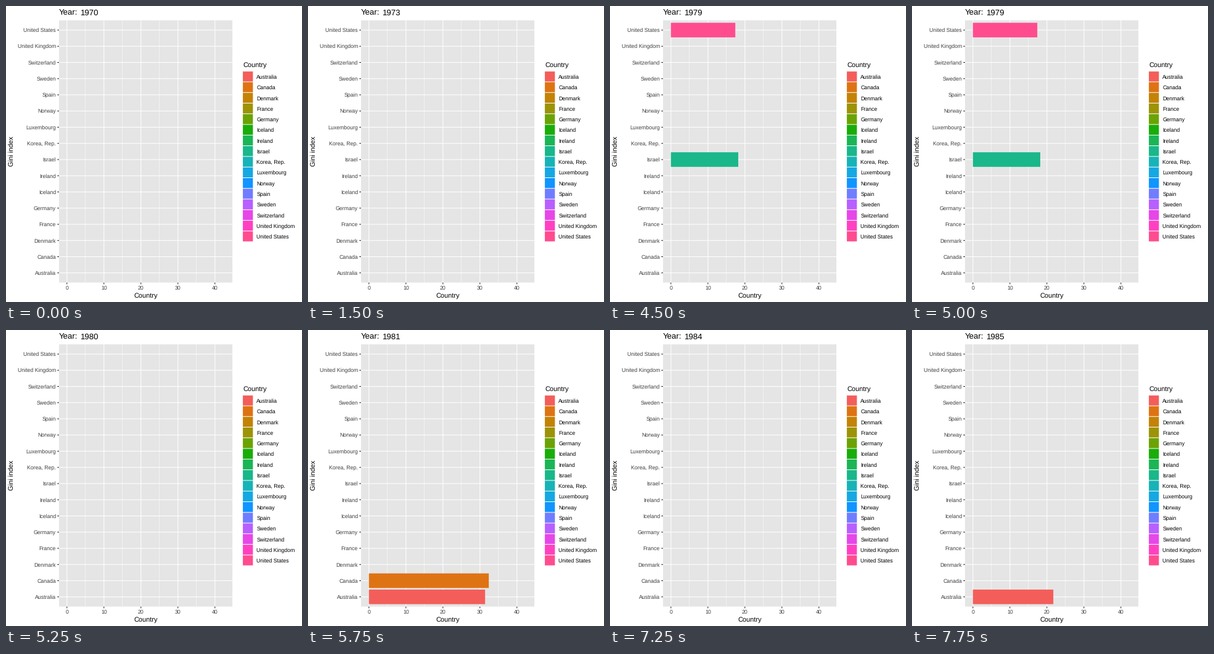
These frames come from a looping animation (480 px wide and 480 px high, 8 s). A matplotlib script:

```python
import matplotlib.pyplot as plt
from matplotlib.animation import FuncAnimation
from matplotlib.patches import Rectangle

plt.rcParams.update({"font.family": "Liberation Sans", "text.hinting": "none"})

SIZE, DPI = 480, 72
LEFT, RIGHT, TOP, BOTTOM = 86.0, 367.1, 23.3, 448.5
STEP = (BOTTOM - TOP) / 16.2
ZERO = LEFT + (RIGHT - LEFT) / 22
UNIT = 6.0
KEY = 17.28
LINE = 1.07
INK, LABEL, PANEL = "#272727", "#404040", "#e5e5e5"

COUNTRIES = {
    "Australia": "#f35e5a", "Canada": "#de7313", "Denmark": "#c38306",
    "France": "#9c9307", "Germany": "#6ba204", "Iceland": "#1aad0a",
    "Ireland": "#1bb556", "Israel": "#19b78a", "Korea, Rep.": "#17b3b7",
    "Luxembourg": "#15a8e2", "Norway": "#1195ff", "Spain": "#707dff",
    "Sweden": "#b85fff", "Switzerland": "#e647e8",
    "United Kingdom": "#ff41c1", "United States": "#ff4c8f",
}

# country, Gini value, {frame: share of the full length}
RISES = [
    ("United States", 34.8, {18: 1 / 2, 19: 1, 20: 1 / 2}),
    ("Israel", 36.4, {18: 1 / 2, 19: 1, 20: 1 / 2}),
    ("Canada", 32.4, {22: 1 / 2, 23: 1, 24: 1 / 2}),
    ("Australia", 31.4, {22: 1 / 2, 23: 1, 24: 1 / 2}),
    ("Australia", 32.6, {30: 1 / 3, 31: 2 / 3}),
]

fig = plt.figure(figsize=(SIZE / DPI, SIZE / DPI), dpi=DPI, facecolor="white")
ax = fig.add_axes([0, 0, 1, 1])
ax.set(xlim=(0, SIZE), ylim=(SIZE, 0))
ax.axis("off")


def box(x, y, w, h, color, z=1):
    return ax.add_patch(Rectangle((x, y), w, h, fc=color, lw=0, zorder=z, snap=False))


def line(x0, y0, x1, y1, color="white", width=LINE):
    ax.plot([x0, x1], [y0, y1], color=color, lw=width, zorder=2,
            solid_capstyle="butt", snap=False)


def text(x, y, s, size=8.8, color="black", ha="left", **kw):
    return ax.text(x, y, s, fontsize=size, color=color, ha=ha, va="baseline", **kw)


def row_y(i):
    return BOTTOM - (0.6 + i) * STEP


box(LEFT, TOP, RIGHT - LEFT, BOTTOM - TOP, PANEL)
for value in range(5, 40, 10):
    x = ZERO + value * UNIT
    line(x, TOP, x, BOTTOM, width=LINE / 2)
for value in range(0, 50, 10):
    x = ZERO + value * UNIT
    line(x, TOP, x, BOTTOM)
    line(x, BOTTOM, x, BOTTOM + 2.75, INK)
    text(x, 460, value, color=LABEL, ha="center")

bars = {}
for i, (name, color) in enumerate(COUNTRIES.items()):
    y = row_y(i)
    line(LEFT, y, RIGHT, y)
    line(LEFT - 2.75, y, LEFT, y, INK)
    text(81, y + 3.2, name, color=LABEL, ha="right")
    bars[name] = box(ZERO, y - 0.45 * STEP, 0, 0.9 * STEP, color, z=3)

    key_y = 105.7 + i * KEY
    box(383.6, key_y, KEY, KEY, "white")
    box(384.1, key_y + 0.5, KEY - 1, KEY - 1, color)
    text(406.4, key_y + 12.2, name)

text(384, 99, "Country", 11)
text((LEFT + RIGHT) / 2, 473, "Country", 11, ha="center")
ax.text(13, (TOP + BOTTOM) / 2, "Gini index", fontsize=11, rotation=90,
        rotation_mode="anchor", ha="center", va="baseline")
text(86, 15, "Year:", 13.2)
year = text(121.2, 15, "", 13.2)


def update(frame):
    year.set_text(1970 + (frame if frame < 20 else frame - 1) // 2)
    for bar in bars.values():
        bar.set_width(0)
    for name, value, shares in RISES:
        if frame in shares:
            bars[name].set_width(value * shares[frame] * UNIT)
    return [year, *bars.values()]


anim = FuncAnimation(fig, update, frames=32, interval=250, repeat=True, repeat_delay=0)
plt.show()
```
